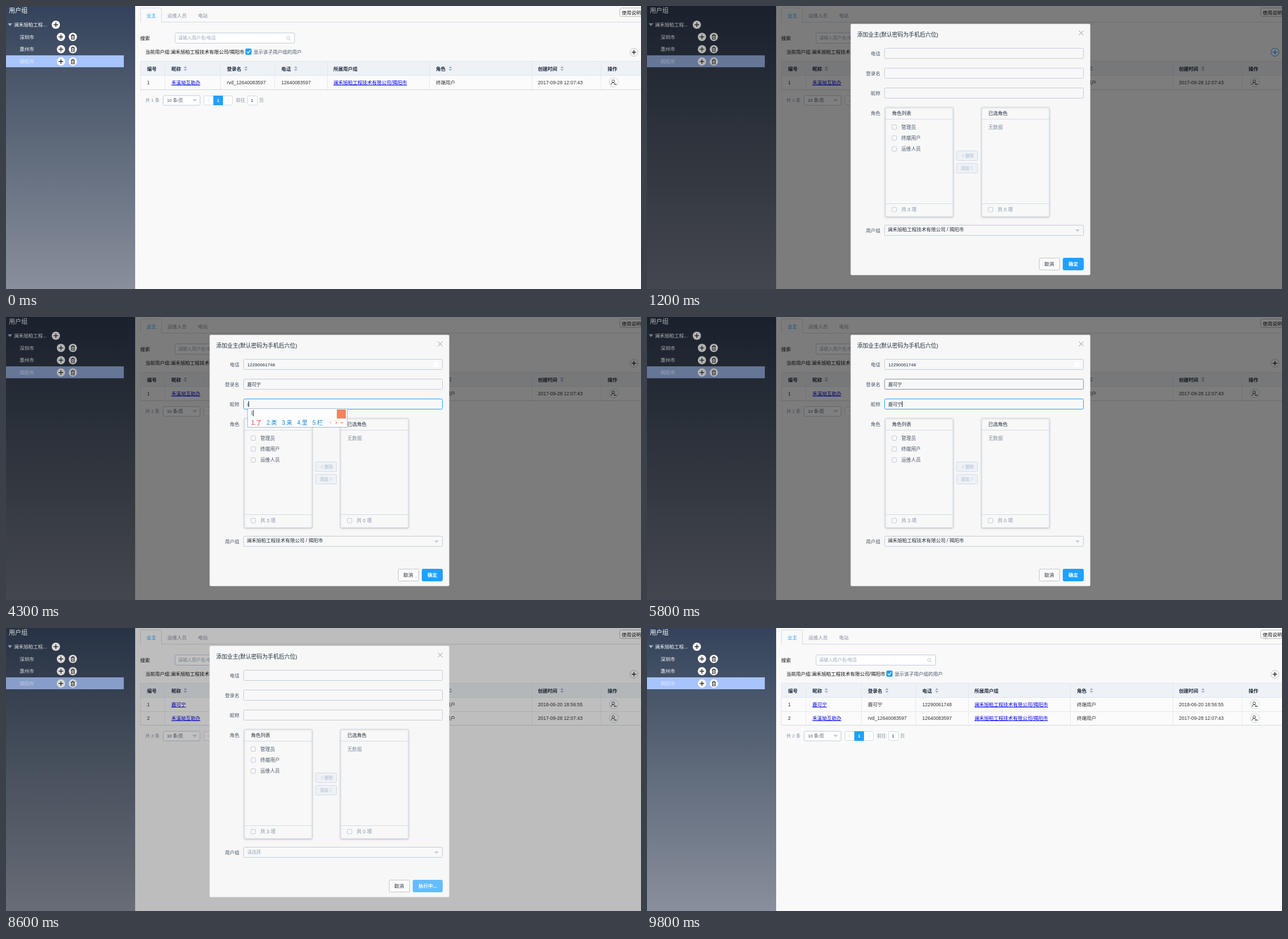
Write an HTML page with a canvas that moves like this. It is 1121x499 px and loops after 9900 ms.

```html
<!DOCTYPE html>
<html lang="zh-CN">
<head>
<meta charset="utf-8">
<title>用户组</title>
<style>
html, body { margin: 0; width: 100%; height: 100%; overflow: hidden; background: #f9f9f9; }
canvas { display: block; width: 100vw; height: 100vh; }
</style>
</head>
<body>
<canvas id="stage" width="1121" height="499"></canvas>
<script>
const W = 1121, H = 499, LOOP = 9900, TICK = 100;
const stage = document.getElementById('stage').getContext('2d');
const layer = Object.assign(document.createElement('canvas'), { width: W, height: H }).getContext('2d');
let ctx = stage;

const FONT = '"Liberation Sans", "Noto Sans CJK SC", "Noto Sans CJK", sans-serif';
const BLUE = '#20a0ff', HOVER = '#4db3ff', PRESSED = '#1d90e6', LINE = '#dfe6ec', EDGE = '#bfcbd9';
const INK = '#1f2d3d', GRAY = '#8391a5', SLATE = '#48576a', PAPER = '#f8f8f8';

const COMPANY = '澜禾旭柏工程技术有限公司', CITY = '揭阳市';
const NAME = '鹿可宁', PHONE = '12290061748';
const OLD = { nick: '禾溪坳互助办', login: 'rvd_12640083597', phone: '12640083597', date: '2017-09-28 12:07:43' };
const NEW = { nick: NAME, login: NAME, phone: PHONE, date: '2018-06-20 18:56:55' };

// Input method: letters typed so far and the words offered for them
const PINYIN = 'lukening';
const WORDS = [
  '了 类 来 里 栏', '路 录 陆 露 炉', '路口 路况 路考 露口 录口', '路客 录课 露刻 路可 鹿可',
  '路可能 录课内 鹿可能 路客 鹿可', '路可你 录课你 鹿可你 路客 鹿可',
  '路可您呢 录课您呢 鹿可您呢 路可您 鹿可您', '鹿可宁 路可宁 录课宁 鹿可 路客'
].map(s => s.split(' '));

const easeOut = x => 1 - (1 - Math.min(1, Math.max(0, x))) ** 2;
const within = (t, a, b) => t >= a && t < b;

function text(s, x, cy, color = INK, size = 8.5, { weight = 400, align = 'left' } = {}) {
  ctx.font = `${weight} ${size}px ${FONT}`;
  ctx.textAlign = align;
  ctx.fillStyle = color;
  ctx.fillText(s, x, cy + size * 0.37);
  return ctx.measureText(s).width;
}

function rect(x, y, w, h, color) {
  ctx.fillStyle = color;
  ctx.fillRect(x, y, w, h);
}

function box(x, y, w, h, fill, stroke, r = 2) {
  ctx.beginPath();
  ctx.roundRect(x + 0.5, y + 0.5, w - 1, h - 1, r);
  if (fill) { ctx.fillStyle = fill; ctx.fill(); }
  if (stroke) { ctx.strokeStyle = stroke; ctx.lineWidth = 1; ctx.stroke(); }
}

function path(points, color, width = 1) {
  ctx.beginPath();
  for (let i = 0; i < points.length; i += 2) ctx.lineTo(points[i], points[i + 1]);
  ctx.strokeStyle = color;
  ctx.lineWidth = width;
  ctx.stroke();
}

function tri(x, y, half, h, color) {
  ctx.beginPath();
  ctx.moveTo(x - half, y);
  ctx.lineTo(x + half, y);
  ctx.lineTo(x, y + h);
  ctx.fillStyle = color;
  ctx.fill();
}

function disc(x, y, r, fill, stroke) {
  ctx.beginPath();
  ctx.arc(x, y, r, 0, 7);
  if (fill) { ctx.fillStyle = fill; ctx.fill(); }
  if (stroke) { ctx.strokeStyle = stroke; ctx.lineWidth = 1; ctx.stroke(); }
}

function plus(x, y, color) {
  path([x - 4, y, x + 4, y], color, 1.4);
  path([x, y - 4, x, y + 4], color, 1.4);
}

function chevron(x, y, dir, color, s = 2.5) {
  path([x - dir * s / 2, y - s, x + dir * s / 2, y, x - dir * s / 2, y + s], color);
}

function checkbox(x, y, state, size = 9) {
  const on = state === 'on' || state === 'part', h = size / 2;
  box(x - h, y - h, size, size, on ? BLUE : PAPER, on || state === 'hover' ? BLUE : EDGE, 1.5);
  if (state === 'on') path([x - h * 0.5, y, x - 0.5, y + h * 0.45, x + h * 0.55, y - h * 0.45], '#fff', 1.3);
  if (state === 'part') path([x - 2, y, x + 2, y], '#fff', 1.3);
}

// ---------- page ----------
function sideBack() {
  const g = ctx.createLinearGradient(0, 0, 0, H);
  g.addColorStop(0, '#34435b');
  g.addColorStop(0.5, '#5f6a7b');
  g.addColorStop(1, '#898f9c');
  rect(0, 0, 228, H, g);
}

function sideFront(mask) {
  const lit = (r, g, b, k = 0.6) => `rgb(${[r, g, b].map(v => v * (1 - k * mask)).join()})`;
  const white = lit(255, 255, 255), dark = '#222';
  rect(0, 87, 208, 21, lit(168, 196, 252, 0.8));
  text('用户组', 5, 8, white, 11);
  tri(7, 30.5, 4, 5, lit(165, 180, 205));
  text(COMPANY.slice(0, 6) + '...', 14, 33, white);
  const button = (x, y) => disc(x, y, 7.3, white);
  button(88, 33);
  plus(88, 33, dark);
  ['深圳市', '惠州市', CITY].forEach((city, i) => {
    const y = 54.5 + i * 21.7;
    text(city, 24, y, i === 2 ? lit(225, 235, 255) : white);
    button(97, y);
    plus(97, y, dark);
    button(118, y);
    path([114.5, y - 2.5, 121.5, y - 2.5], dark);
    path([116.5, y - 4, 119.5, y - 4], dark);
    ctx.strokeStyle = dark;
    ctx.strokeRect(115.5, y - 2.5, 5, 6.5);
    path([117.3, y - 0.5, 117.3, y + 2.5], dark, 0.7);
    path([118.8, y - 0.5, 118.8, y + 2.5], dark, 0.7);
  });
}

const groupCheck = () => checkbox(428, 80.5, 'on', 11);

function pageMark(y) {
  rect(366, y - 8.5, 17, 17, BLUE);
  text('1', 374.5, y, '#fff', 8, { align: 'center', weight: 700 });
}

function link(s, x, y) {
  const w = text(s, x, y, '#0000ee');
  rect(x, Math.round(y + 4.5), w, 1, '#0000ee');
}

function tableRow(row, index, y) {
  text(index, 249, y, '#333');
  link(row.nick, 292, y);
  text(row.login, 390, y, '#333');
  text(row.phone, 486, y, '#333');
  link(`${COMPANY}/${CITY}`, 578, y);
  text('终端用户', 759, y, '#333');
  text(row.date, 939, y, '#333');
  disc(1073, y, 8, '#fff', '#c9d0d8');
  disc(1072, y - 2, 2.3, null, '#444');
  ctx.beginPath();
  ctx.arc(1072, y + 4.5, 4, Math.PI, Math.PI * 1.75);
  ctx.stroke();
  path([1073, y + 3.5, 1078, y + 3.5], '#444', 1.4);
}

function page(t, rows, hotPlus) {
  // tabs and toolbar
  rect(237, 28, 884, 1, '#d1dbe5');
  box(237, 3, 38, 27, '#f9f9f9', '#d1dbe5');
  rect(238, 28, 36, 3, '#f9f9f9');
  text('业主', 248, 17, BLUE);
  text('运维人员', 285, 17, GRAY);
  text('电站', 339, 17, GRAY);
  box(1083, 3, 50, 16, '#fff', '#b5b5b5', 3);
  text('使用说明', 1087, 11.5, '#111');
  text('搜索', 237, 57, '#111');
  box(298, 47, 212, 19, '#fff', EDGE);
  text('请输入用户名/电话', 304, 56.5, '#97a8be', 8);
  disc(498, 56, 2.8, null, EDGE);
  path([500, 58, 502.5, 60.5], EDGE);
  text(`当前用户组:${COMPANY}/${CITY}`, 246, 80.5, '#111');
  groupCheck();
  text('显示该子用户组的用户', 437, 80.5, SLATE);
  disc(1108.5, 81.5, 7, '#fff', hotPlus ? BLUE : '#bbb');
  plus(1108.5, 81.5, hotPlus ? BLUE : '#222');

  // table
  const bottom = 122 + Math.round(rows.length * 24.5);
  rect(237, 98, 884, 24, '#eef1f6');
  rect(237, 122, 884, bottom - 122, '#fbfbfb');
  if (within(t, 9500, 9800)) rect(1023, 122, 98, 25, '#f3f6fa');
  rect(237, 97, 884, 1, LINE);
  rect(237, 122, 884, 1, LINE);
  for (const x of [280, 378, 474, 567, 747, 928, 1050]) rect(x, 98, 1, bottom - 98, '#e3e9ef');
  rect(237, 98, 1, bottom - 98, LINE);
  const heads = [['编号', 249], ['昵称', 292, 316], ['登录名', 390, 423], ['电话', 486, 511],
    ['所属用户组', 578], ['角色', 759, 784], ['创建时间', 939, 981], ['操作', 1062]];
  for (const [label, x, sort] of heads) {
    text(label, x, 110.5, INK, 8.5, { weight: 700 });
    if (!sort) continue;
    tri(sort + 0.5, 109.3, 3, -3, '#97a8be');
    tri(sort + 0.5, 111.3, 3, 3, '#97a8be');
  }
  rows.forEach((row, i) => {
    tableRow(row, i + 1, 134.5 + i * 24.3);
    rect(237, 122 + Math.round((i + 1) * 24.5), 884, 1, i === rows.length - 1 ? '#cfd6dd' : LINE);
  });

  // pagination
  const y = bottom + 19.5;
  text(`共 ${rows.length} 条`, 246, y, GRAY, 8);
  box(277, y - 9, 66, 18, '#fff', EDGE);
  text('10 条/页', 284, y, SLATE, 7.8);
  tri(333, y - 2, 4, 4, EDGE);
  box(349, y - 8.5, 51, 17, '#fff', '#d1dbe5');
  chevron(357.5, y, -1, '#d1dbe5');
  chevron(392, y, 1, '#d1dbe5');
  pageMark(y);
  text('前往', 406, y, GRAY, 8);
  box(426, y - 8.5, 18, 17, '#fff', '#d1dbe5');
  text('1', 434.5, y, INK, 8, { align: 'center' });
  text('页', 447, y, GRAY, 8);
  return y;
}

// ---------- dialog ----------
function typing(t) {
  if (within(t, 3000, 4000)) return { field: 1, step: Math.min(t < 3800 ? 6 : 7, (t - 3000) / 100) };
  if (within(t, 4300, 5000)) return { field: 2, step: (t - 4300) / 100 + (t > 4300 ? 1 : 0) };
  return null;
}

function digits(t) {
  if (t < 1800) return 0;
  return t < 2000 ? 1 : t < 2100 ? 4 : t < 2200 ? 6 : t < 2300 ? 9 : 11;
}

function field(label, y, value, { focus, hover, caret, edge = EDGE }) {
  text(label, 412, y, SLATE, 8.5, { align: 'right' });
  box(419, y - 9.5, 352, 19, PAPER, focus ? BLUE : hover ? GRAY : edge);
  const w = text(value, 426, y + 0.5, INK, 8);
  if (caret) rect(Math.round(426 + w), y - 5, 1, 10, '#111');
}

function imePopup(top, step) {
  const words = WORDS[step];
  let end = 433;
  for (const w of words) end += 17 + w.length * 10;
  const edge = end + 35;
  box(426, top, edge - 426, 34, '#fbfcfe', '#a9b7c8', 0);
  const w = text(PINYIN.slice(0, step + 1), 433, top + 8.5, '#1a5fa0', 9.5);
  rect(Math.round(434 + w), top + 3, 1, 11, '#222');
  let x = 433;
  words.forEach((word, i) => {
    text(`${i + 1}.${word}`, x, top + 25, i ? '#1787cf' : '#f03030', 10);
    x += 17 + word.length * 10;
  });
  chevron(end + 5, top + 25, -1, '#bbb');
  chevron(end + 15, top + 25, 1, '#e8502c');
  path([end + 22.5, top + 24, end + 25, top + 26.5, end + 27.5, top + 24], '#e8502c');
  rect(edge - 19, top + 2, 16, 16, '#f3835f');
}

function panel(x, title, items, foot, footState) {
  ctx.save();
  ctx.shadowColor = 'rgba(0,0,0,.18)';
  ctx.shadowBlur = 3;
  ctx.shadowOffsetY = 1;
  box(x, 178, 121, 194, PAPER, '#d1dbe5');
  ctx.restore();
  rect(x, 199, 121, 1, '#d1dbe5');
  rect(x, 348, 121, 1, '#d1dbe5');
  text(title, x + 12.5, 189, INK);
  items.forEach(([label, state, tint], i) => {
    const y = 213.5 + i * 19.3;
    if (tint) rect(x + 1, y - 10, 119, 19.5, tint);
    checkbox(x + 16.5, y, state);
    text(label, x + 29, y, SLATE, 8.6);
  });
  if (!items.length) text('无数据', x + 12.5, 213.5, GRAY, 8.6);
  checkbox(x + 16.5, 359, footState);
  text(foot, x + 29, 359, GRAY, 8.7);
}

function moveButton(y, label, dir, fill) {
  box(546, y, 38, 18, fill || '#eef1f6', fill || '#d1dbe5');
  const color = fill ? '#fff' : EDGE;
  text(label, dir < 0 ? 569.5 : 561.5, y + 9, color, 7.5, { align: 'center', weight: 700 });
  chevron(dir < 0 ? 558 : 573, y + 9, dir, color, 3);
}

function dialog(t) {
  const reset = t >= 8500, checked = within(t, 6500, 7800), moved = t >= 7800 && !reset;
  const ime = typing(t);
  box(359, 31, 424, 444, '#f7f7f7', null, 2);
  text('添加业主(默认密码为手机后六位)', 371, 50, INK, 9.75, { weight: 500 });
  path([762.5, 43.5, 770.5, 51.5], GRAY);
  path([770.5, 43.5, 762.5, 51.5], GRAY);

  const on = i => within(t, ...[[1700, 2400], [2400, 4100], [4100, 6500]][i]);
  const value = (i, done) => reset ? '' : ime && ime.field === i ? PINYIN.slice(0, ime.step + 1) : t >= done ? NAME : '';
  field('电话', 83.5, reset ? '' : PHONE.slice(0, digits(t)), { focus: on(0), caret: on(0) });
  if (t >= 2400 && !reset) rect(755, 79, 9, 9, '#fff');
  field('登录名', 118.5, value(1, 4000), {
    focus: on(1), caret: on(1) && !within(t, 2600, 3000), hover: within(t, 5800, 6000)
  });
  field('昵称', 153.5, value(2, 5000), {
    focus: on(2), caret: on(2) && !within(t, 5400, 5800), edge: within(t, 6500, 8500) ? '#b4cfe8' : EDGE
  });

  text('角色', 412, 188.5, SLATE, 8.5, { align: 'right' });
  const hot = within(t, 6300, 6500);
  const roles = [['管理员'], ['终端用户', checked ? 'on' : hot ? 'hover' : ''], ['运维人员']];
  if (within(t, 6700, 7800)) {
    roles[1][2] = '#f5fbff';
    roles[2][2] = '#fff';
  }
  const left = moved ? [roles[0], roles[2]] : roles;
  const leftFoot = checked ? '已选 1/3 项' : `共 ${left.length} 项`;
  panel(420, '角色列表', left, leftFoot, checked ? 'part' : '');
  panel(590, '已选角色', moved ? [['终端用户']] : [], `共 ${moved ? 1 : 0} 项`);
  moveButton(255, '删除', -1);
  const addFill = t >= 7700 ? PRESSED : t >= 7600 ? HOVER : BLUE;
  moveButton(277, '添加', 1, checked && t >= 6600 && addFill);

  text('用户组', 412, 395.5, SLATE, 8.5, { align: 'right' });
  box(419, 386, 352, 19, PAPER, EDGE);
  if (reset) text('请选择', 426, 395.5, '#97a8be', 8);
  else text(`${COMPANY} / ${CITY}`, 425, 393.5, INK);
  tri(760, 394, 4, 4, EDGE);

  const busy = t >= 8200, shift = busy ? 16 : 0;
  box(692 - shift, 444, 37, 22, '#fbfbfb', '#c4c4c4');
  text('取消', 710 - shift, 455, INK, 8.5, { align: 'center' });
  const okFill = busy ? '#63bdff' : t >= 8100 ? PRESSED : t >= 8000 ? HOVER : BLUE;
  box(734 - shift, 444, 37 + shift, 22, okFill, okFill);
  text(busy ? '执行中...' : '确定', 752.5 - shift / 2, 455, '#fff', 8.5, { align: 'center', weight: 700 });

  if (ime) imePopup(ime.field === 1 ? 126 : 161, ime.step);
}

// The dialog is drawn solid on its own layer, so that it fades as one piece
function fadeDialog(t, shown) {
  ctx = layer;
  ctx.clearRect(0, 0, W, H);
  dialog(t);
  ctx = stage;
  ctx.globalAlpha = shown ** 1.4;
  ctx.drawImage(layer.canvas, 0, -Math.round(20 * (1 - shown)));
  ctx.globalAlpha = 1;
}

function draw(t) {
  const shown = easeOut((t - 850) / 300) - easeOut((t - 8651) / 249);
  const mask = 0.5 * (easeOut((t - 780) / 400) - easeOut((t - 8480) / 400));
  rect(0, 0, W, H, '#f9f9f9');
  sideBack();
  const pagerY = page(t, t >= 8500 ? [NEW, OLD] : [OLD], within(t, 400, 1600));
  rect(0, 0, W, H, `rgba(0,0,0,${mask})`);
  sideFront(mask);
  if (shown <= 0) return;
  fadeDialog(t, shown);
  if (shown < 1) {
    // bright marks still show through the fading dialog
    ctx.globalAlpha = 0.3;
    groupCheck();
    pageMark(pagerY);
    ctx.globalAlpha = 1;
  }
}

const start = performance.now();
function frame() {
  const t = (performance.now() - start) % LOOP;
  draw(Math.floor(t / TICK) * TICK);
  requestAnimationFrame(frame);
}
frame();
</script>
</body>
</html>
```
